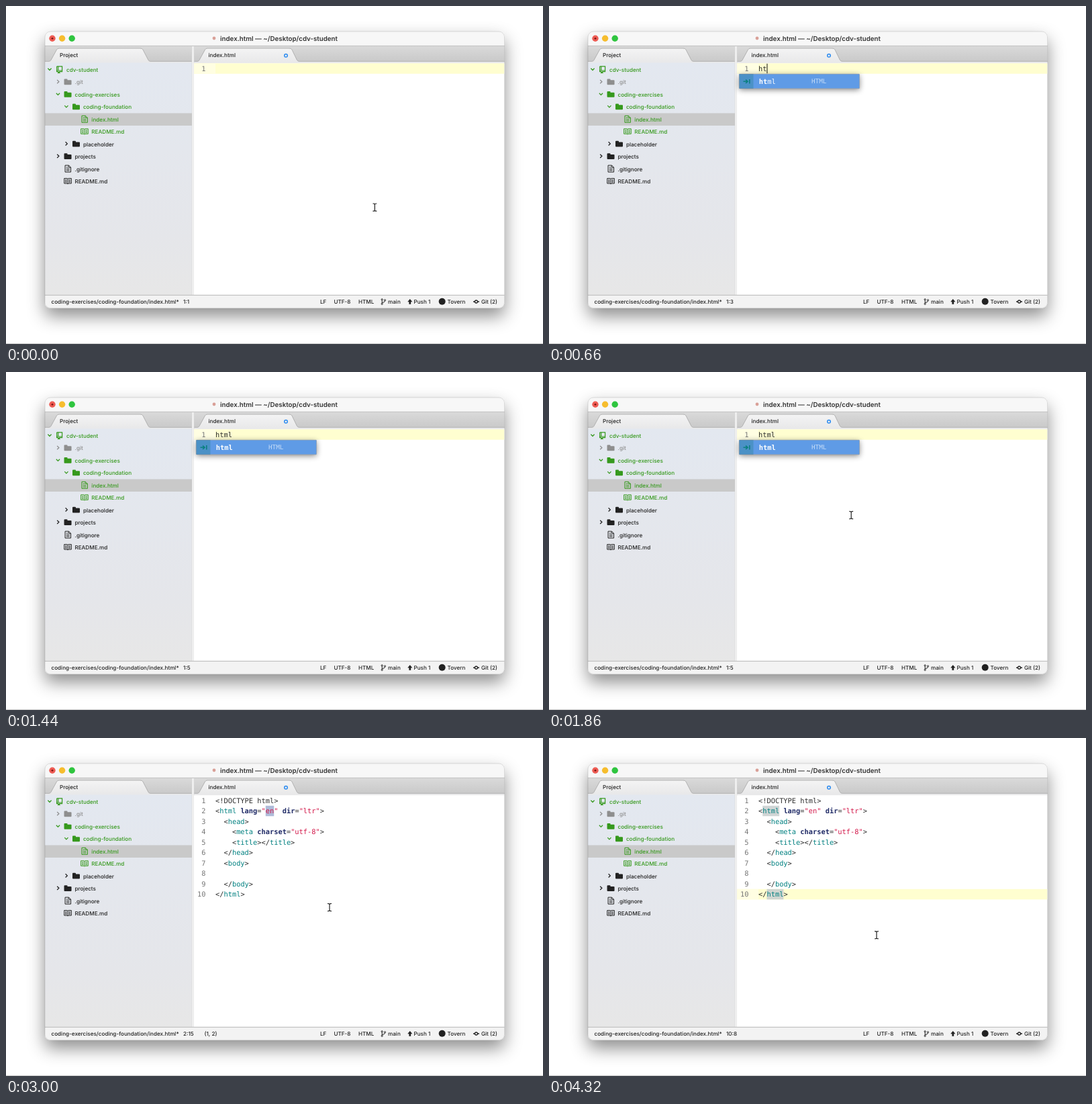
Animation, 800 px wide and 503 px high, one loop 4.38 s. Source, as an HTML page:

```html
<!DOCTYPE html>
<html lang="en">
<head>
<meta charset="utf-8">
<title>Code editor</title>
<style>
html, body { margin: 0; width: 100%; height: 100%; overflow: hidden; background: #fff; }
svg { display: block; width: 800px; height: 503px; }
text { font: 500 8.15px Inter, sans-serif; fill: #222; white-space: pre; text-rendering: geometricPrecision; }
.title { font-size: 9.75px; font-weight: 600; fill: #333; }
.code { font: 10.35px "DejaVu Sans Mono", monospace; fill: #2b2b2b; }
.label { font: 9.3px "DejaVu Sans Mono", monospace; fill: #7d7d7d; }
.num { fill: #777; text-anchor: end; }
.bold { font-weight: 700; }
.tag { fill: #008080; }
.attr { fill: #1f2a66; font-weight: 700; }
.str { fill: #d3184a; }
.line { fill: none; stroke: currentColor; }
</style>
</head>
<body>
<svg viewBox="0 0 800 503">
  <defs>
    <linearGradient id="bar" x2="0" y2="1"><stop stop-color="#dadada"/><stop offset="1" stop-color="#c9c9c9"/></linearGradient>
    <linearGradient id="tab" x2="0" y2="1"><stop stop-color="#f4f4f4"/><stop offset="1" stop-color="#e9e9ea"/></linearGradient>
    <linearGradient id="side" x2="0" y2="1"><stop stop-color="#e3e8f0"/><stop offset=".75" stop-color="#e5e6ea"/><stop offset="1" stop-color="#e7e7e7"/></linearGradient>
    <filter id="shadow" x="-20%" y="-20%" width="140%" height="150%"><feDropShadow dx="0" dy="12" stdDeviation="13" flood-opacity=".45"/></filter>
    <filter id="lift" x="-20%" y="-80%" width="140%" height="300%"><feDropShadow dx="0" dy="2" stdDeviation="4" flood-opacity=".48"/></filter>
    <clipPath id="frame"><rect x="58" y="38" width="684.5" height="411.5" rx="8"/></clipPath>
    <path id="down" class="line" stroke-width="1.3" d="M-2.6-1.4L0 1.3 2.6-1.4"/>
    <path id="right" class="line" stroke-width="1.3" d="M-1.3-2.6L1.4 0-1.3 2.6"/>
    <path id="folder" fill="currentColor" d="M-5.5-3.4q0-1 1-1h3q1 0 1 1v.7h5q1 0 1 1v5q0 1-1 1h-9q-1 0-1-1z"/>
    <path id="file" class="line" d="M-4-5H1.5L4.5-2V5H-4zM1.2-5v3.2h3M-2.3-2h2.5M-2.3.5h5M-2.3 2.7h5"/>
    <path id="book" class="line" d="M-5.3-4H-1L0-3.2 1-4H5.3V3.5H1L0 4.5-1 3.5H-5.3zM0-3.2V4M-3.9-1.8h2.4M-3.9 0h2.4M-3.9 1.7h2.4M1.5-1.8h2.4M1.5 0h2.4M1.5 1.7h2.4"/>
    <path id="repo" class="line" stroke-width="1.2" d="M-4-4.6H4V3.2H.3M-2.5 3.2H-4V-4.6M-2-4.6V1.5M-4 1.5H4M-1.8 2.5V5l1-.8 1 .8V2.5"/>
    <path id="ibeam" fill="none" stroke-linecap="round" d="M-2.5-5.6Q0-5.6 0-4.3 0-5.6 2.5-5.6M0-4.5V4.5M-2.5 5.6Q0 5.6 0 4.3 0 5.6 2.5 5.6"/>
    <path id="arrow" fill="#111" stroke="#fff" stroke-width=".9" d="M0 0V10.6l2.4-2.3 1.7 3.9 1.9-.8-1.7-3.8h3.4z"/>
    <path id="insert" class="line" stroke-width="1.6" d="M-5 0H1M-1.4-2.6L1.5 0-1.4 2.6M4.3-3.3V3.3"/>
  </defs>

  <rect y="502" width="800" height="1" fill="#c6c6c6"/>
  <rect x="58" y="38" width="684.5" height="411.5" rx="8" fill="#fff" filter="url(#shadow)"/>
  <g clip-path="url(#frame)">
    <rect x="58" y="38" width="685" height="21" fill="#f7f7f7"/>
    <rect x="58" y="59" width="685" height="24" fill="url(#bar)"/>
    <path stroke="#c2c2c2" d="M58 59.3H743"/>
    <rect x="58" y="82" width="685" height="3.4" fill="#e9e9ea"/>
    <g fill="url(#tab)" stroke="#a6a6a6" stroke-width=".8">
      <path d="M58 82.4H64Q66 82.4 67 80.500L75.500 65Q76.500 63 79 63H200Q203 63 204 65L212 80.500Q213 82.400 215 82.400H277"/>
      <path d="M280 82.400H285Q287 82.400 288 80.500L296.500 65Q297.500 63 300 63H422Q425 63 426 65L433.500 80.500Q434.500 82.400 437 82.400H743"/>
    </g>
    <rect x="58" y="84.500" width="219" height="346" fill="url(#side)"/>
    <rect x="277" y="60" width="3" height="370" fill="#f3f3f3"/>
    <path stroke="#d8d8d8" stroke-width=".6" d="M277 60V430M280 60V430"/>
    <rect x="280" y="85.300" width="463" height="345" fill="#fff"/>
    <rect x="58" y="159.500" width="219" height="18.500" fill="#c9c9c9"/>
    <rect x="58" y="430" width="685" height="20" fill="#f3f3f3"/>
    <path stroke="#b8b8b8" d="M58 430.300H743"/>
  </g>
  <rect x="58" y="38" width="684.500" height="411.500" rx="8" fill="none" stroke="#000" stroke-opacity=".2" stroke-width=".6"/>

  <circle cx="69" cy="48.300" r="4.700" fill="#ee5c54"/><circle cx="69" cy="48.300" r="1.400" fill="#7a1512"/>
  <circle cx="83.600" cy="48.300" r="4.700" fill="#f6bd2e"/>
  <circle cx="98.200" cy="48.300" r="4.700" fill="#2fc53f"/>
  <circle cx="310" cy="48" r="2.400" fill="#d9a098"/>
  <text class="title" x="319" y="51.600">index.html — ~/Desktop/cdv-student</text>
  <text x="80" y="76">Project</text>
  <text x="301.500" y="76">index.html</text>
  <circle cx="417" cy="73.800" r="2.300" fill="none" stroke="#2f8df0" stroke-width="1.500"/>

  <g id="tree"></g>
  <g id="status"></g>
  <g class="line" color="#222" stroke-width="1">
    <circle cx="560.200" cy="436.800" r="1.100"/><circle cx="560.200" cy="443.300" r="1.100"/><circle cx="564.500" cy="437.800" r="1.100"/>
    <path d="M560.200 438V442.200M564.500 439Q564.500 441 560.400 441.500"/>
    <circle cx="700.500" cy="440" r="2" stroke-width="1.300"/><path stroke-width="1.300" d="M696 440h2.500M702.500 440h2.500"/>
  </g>
  <path fill="#222" d="M601.800 436l3.600 4.200h-2.200v3.600h-2.800v-3.600h-2.200z"/>
  <circle cx="649.700" cy="439.800" r="5" fill="#222"/>
  <g id="editor"></g>
</svg>
<script>
const LOOP = 4380, STEP = 60, CHAR = 6.23, LEFT = 312, TOP = 85.3, ROW = 15.5, BLINK = 235;
const KEYS = [240, 600, 840, 1140], INSERT = 2580, CLICK = 3120;
const GREEN = '#36991d', GRAY = '#8e8e8e', DARK = '#222';

const $ = id => document.getElementById(id);
const esc = s => s.replace(/</g, '&lt;');
const text = (x, y, s, cls = '', fill = '') =>
  `<text x="${x}" y="${y}" class="${cls}" ${fill && `style="fill:${fill}"`}>${s}</text>`;
const rect = (x, y, w, h, fill) => `<rect x="${x}" y="${y}" width="${w}" height="${h}" fill="${fill}"/>`;
const icon = (id, x, y, color = DARK) =>
  `<use href="#${id}" color="${color}" transform="translate(${x} ${y})"/>`;

// name, icon, chevron, depth, colour
$('tree').innerHTML = [
  ['cdv-student', 'repo', 'down', 0, GREEN],
  ['.git', 'folder', 'right', 1, GRAY],
  ['coding-exercises', 'folder', 'down', 1, GREEN],
  ['coding-foundation', 'folder', 'down', 2, GREEN],
  ['index.html', 'file', '', 3, GREEN],
  ['README.md', 'book', '', 3, GREEN],
  ['placeholder', 'folder', 'right', 2, DARK],
  ['projects', 'folder', 'right', 1, DARK],
  ['.gitignore', 'file', '', 1, DARK],
  ['README.md', 'book', '', 1, DARK]
].map(([name, kind, chevron, depth, color], i) => {
  const x = 65 + depth * 12.45, y = 95 + i * 18.45;
  return (chevron && icon(chevron, x, y - .8, color)) +
    icon(kind, x + 14.6, y - .5, color) + text(x + 25, y + 3, name, '', color);
}).join('');

$('status').innerHTML = [
  [67.5, 'coding-exercises/coding-foundation/index.html*'], [468, 'LF'], [488.5, 'UTF-8'],
  [525, 'HTML'], [569, 'main'], [607.5, 'Push 1'], [657.5, 'Tovern'], [708, 'Git (2)']
].map(([x, s]) => text(x, 443, s)).join('');

const highlight = line => line.split(/(".*?"|\w+(?==)|(?<=<\/?)\w+)/).map((s, i, all) => {
  if (i % 2 === 0) return esc(s);
  const cls = s[0] === '"' ? 'str' : /[<\/]$/.test(all[i - 1]) ? 'tag' : 'attr';
  return `<tspan class="${cls}">${s}</tspan>`;
}).join('');

const page = `<!DOCTYPE html>
<html lang="en" dir="ltr">
  <head>
    <meta charset="utf-8">
    <title></title>
  </head>
  <body>

  </body>
</html>`.split('\n').map(highlight);

const hints = [1, 2, 3, 4, 5, 6].map(n => ['h' + n, 'Heading ' + n]).concat(
  [['hack', 'hack'], ['head', 'Head'], ['header', 'Header'], ['hgroup', 'Heading Group']]);

function popup(items, typed, labelX) {
  const x = 283.5, y = 101.3, h = 20.63, w = 179, all = items.length * h + .9;
  return `<g filter="url(#lift)">${rect(x, y, w, all, '#e8e8e8')}</g>` +
    rect(x, y, 21, all, '#b0d5d5') +
    rect(x, y, w, h + .8, '#5f9be6') + rect(x, y, 21, h + .8, '#4b91c6') +
    items.map(([word, label], i) => {
      const mid = y + .4 + h * (i + .5), color = i ? '#111' : '#fff';
      return icon('insert', 294.5, mid + .3, '#0b8080') +
        text(312.8, mid + 3.9, `<tspan class="bold">${word.slice(0, typed)}</tspan>${word.slice(typed)}`, 'code', color) +
        text(labelX, mid + 3.4, label, 'label', i ? '' : '#c5dcf8');
    }).join('') +
    `<rect x="${x}" y="${y}" width="${w}" height="${all}" rx="1" fill="none" stroke="#777" stroke-opacity=".55" stroke-width=".7"/>`;
}

// time, x, y
const path = [[0, 549.4, 299.6], [KEYS[0], 549.4, 299.6], [1560, 501, 272], [2280, 366, 115],
  [INSERT, 366, 115], [3000, 482, 252], [LOOP, 488.3, 295]];

function pointer(t) {
  if (t >= KEYS[0] && t < 1560) return '';
  const i = path.findIndex(p => p[0] > t);
  const [t0, x0, y0] = path[i - 1], [t1, x1, y1] = path[i];
  let k = (t - t0) / (t1 - t0);
  if (t < 3000) k = k * k * (3 - 2 * k);
  const x = x0 + (x1 - x0) * k, y = y0 + (y1 - y0) * k;
  if (t < INSERT && y < 123) return icon('arrow', x, y);
  return [['#fff', 2.4], ['#222', 1.2]].map(([color, width]) =>
    `<use href="#ibeam" stroke="${color}" stroke-width="${width}" transform="translate(${x} ${y})"/>`).join('');
}

const cell = (row, col, n, fill) => rect(LEFT + col * CHAR, TOP + row * ROW, n * CHAR, ROW, fill);
const activeLine = row => rect(280, TOP + row * ROW, 462.3, ROW, '#fffed0') +
  rect(280, TOP + row * ROW, LEFT - 280, ROW, '#fffee2');

function caret(row, col, since) {
  return Math.floor(since / BLINK) % 2 ? '' : rect(LEFT + col * CHAR, TOP + row * ROW + .5, 1, ROW - 1, '#111');
}

function draw(t) {
  const typed = KEYS.filter(k => k <= t).length;
  let lines = ['html'.slice(0, typed)], back = '', front = '', place;
  if (t < INSERT) {
    back = activeLine(0);
    place = '1:' + (typed + 1);
    if (typed) front = caret(0, typed, t - KEYS[typed - 1]) +
      (typed === 1 ? popup(hints, 1, 362) : popup([['html', 'HTML']], typed, 391));
  } else {
    lines = page;
    if (t < CLICK) {
      back = cell(1, 12, 2, '#aebbd9');
      place = '2:15';
      front = text(295.5, 443, '(1, 2)');
    } else {
      back = activeLine(9) + cell(1, 1, 4, '#d0d5d5') + cell(9, 2, 4, '#d0d5d0');
      place = '10:8';
      front = caret(9, 7, t - CLICK);
    }
  }
  $('editor').innerHTML = back + lines.map((line, i) => {
    const y = TOP + i * ROW + 11.4;
    return text(297.5, y, i + 1, 'code num') + text(LEFT, y, line, 'code');
  }).join('') + text(264, 443, place) + front + pointer(t);
}

let last = -1;
function tick(now) {
  const t = Math.floor(now % LOOP / STEP) * STEP;
  if (t !== last) draw(last = t);
  requestAnimationFrame(tick);
}
draw(0);
requestAnimationFrame(tick);
</script>
</body>
</html>
```
